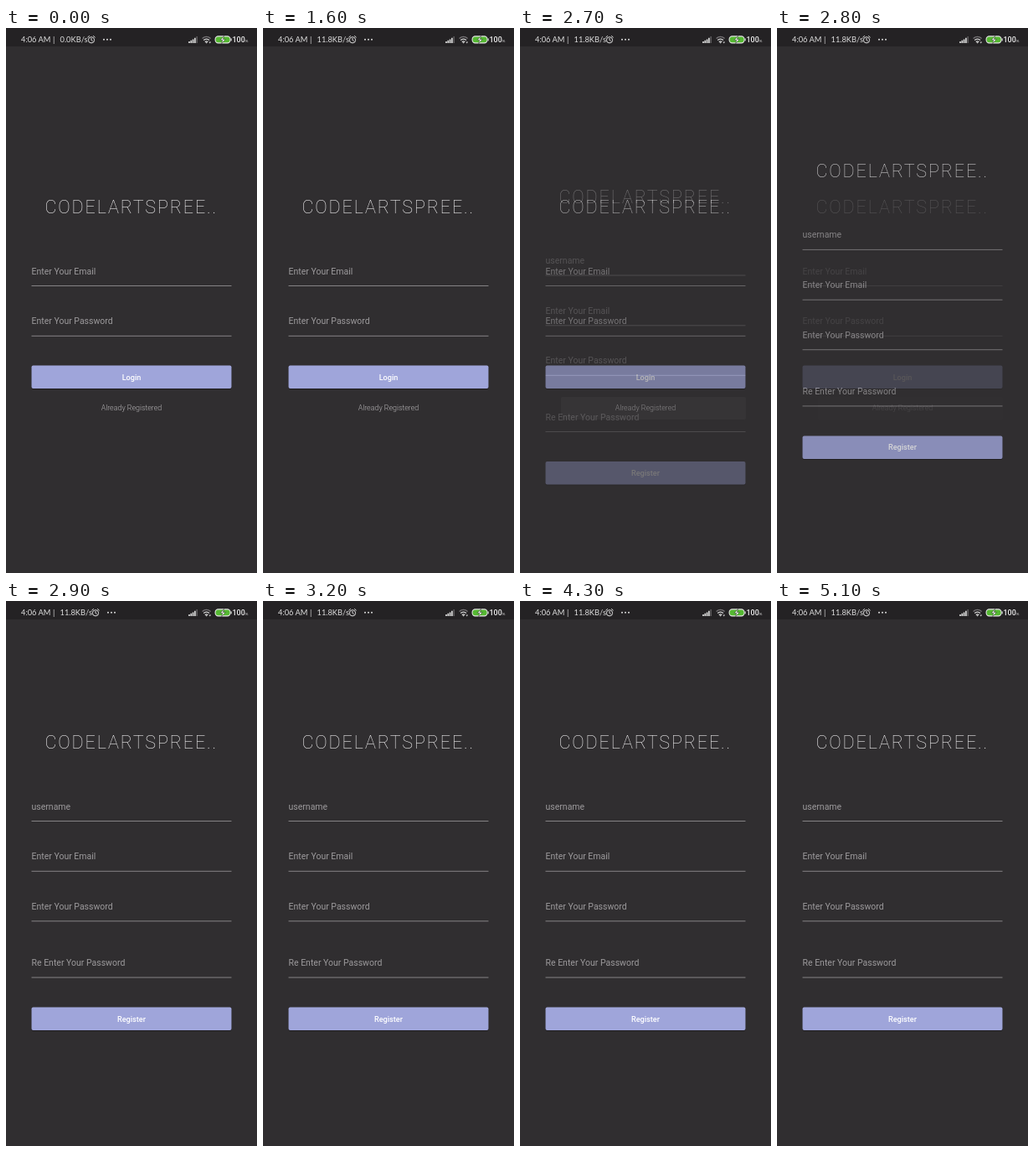
Write an HTML page that moves like this. It is 300 px wide and 650 px high and loops after 5200 ms.

```html
<!DOCTYPE html>
<html lang="en">
<head>
<meta charset="utf-8">
<title>Login to register</title>
<style>
  html, body { margin: 0; width: 100%; height: 100%; overflow: hidden; background: #302e30; }
  svg { display: block; font-family: Roboto, sans-serif; }
  .title { font-size: 21.6px; font-weight: 200; letter-spacing: 1.85px; fill: #f4f3f4; }
  .hint { font-size: 10.5px; fill: #9c9a9c; }
  .button { font-size: 9.1px; font-weight: 500; fill: #fff; text-anchor: middle; }
  .link { font-size: 8.9px; font-weight: 300; fill: #b4b2b4; text-anchor: middle; }
  .status { font: 9.3px Lato, sans-serif; fill: #dedede; }
</style>
</head>
<body>
<svg width="300" height="650" viewBox="0 0 300 650">
  <g id="login"></g>
  <g id="register"></g>
  <g class="status">
    <rect width="300" height="22" fill="#242224"/>
    <text x="18" y="17.3">4:06 AM |</text>
    <text id="speed" x="64.5" y="17.3"></text>
    <g id="alarm" fill="none" stroke="#dedede">
      <circle cy="14.3" r="3.6"/>
      <path d="M0 12v2.5l1.6 1M-4.6 11.3l2.4-2M4.6 11.3l-2.4-2"/>
      <path d="M15 13.8h10" stroke-width="2" stroke-linecap="round" stroke-dasharray="0 4"/>
    </g>
    <path d="M219 18v-2M221.3 18v-3.2M223.6 18v-4.6M225.9 18v-6.2" stroke="#e4e4e4" stroke-width="1.6"/>
    <path d="M228.2 18v-8" stroke="#5c5a5c" stroke-width="1.6"/>
    <g fill="none" stroke-width="1.3">
      <path d="M234.6 12.6q5-4.4 10 0" stroke="#777577"/>
      <path d="M236.2 14.6q3.4-2.8 6.8 0M237.8 16.5q1.8-1.4 3.6 0" stroke="#dedede"/>
    </g>
    <path d="M238.4 17h2.4l-1.2 1.4zM242.6 16.6h2.4l-1.2 2z" fill="#dedede"/>
    <rect x="250.1" y="9.9" width="18" height="8" rx="3.6" fill="#55b832" stroke="#e4e4e4" stroke-width="1.1"/>
    <path d="M269.2 12.4v3" stroke="#e4e4e4"/>
    <path d="M260.6 9.4l-4.4 5h2.6l-1.2 4.2 4.6-5.2h-2.8z" fill="#fff" stroke="#242224" stroke-width=".5"/>
    <text x="270.5" y="17.3" font-family="Roboto, sans-serif" font-weight="500" font-size="9" fill="#eee">100</text>
    <text x="285.8" y="17.3" font-size="4.6">%</text>
  </g>
</svg>
<script>
const LOOP = 5200, STEP = 100;
const byId = id => document.getElementById(id);

const title = y => `<text class="title" x="46.5" y="${y}">CODELARTSPREE..</text>`;
const field = (label, y) => `<text class="hint" x="30.5" y="${y - 14}">${label}</text>
  <path d="M30.5 ${y}h239" stroke="#858385"/>`;
const button = (label, y) => `<rect x="30.5" y="${y + 1}" width="239" height="27.6" rx="2" fill="#1d1b1d"/>
  <rect x="30.5" y="${y}" width="239" height="27.5" rx="2" fill="#9fa5da"/>
  <text class="button" x="150" y="${y + 17}">${label}</text>`;
const page = (...parts) => '<rect width="300" height="850" fill="#302e30"/>' + parts.join('');

byId('login').innerHTML = page(
  title(221.3),
  field('Enter Your Email', 307.5),
  field('Enter Your Password', 367.3),
  button('Login', 402.5),
  '<rect id="press" x="49" y="440" width="221" height="27" rx="2" fill="#3a383a"/>',
  '<text class="link" x="150" y="456.3">Already Registered</text>');

byId('register').innerHTML = page(
  title(176.3),
  field('username', 262.5),
  field('Enter Your Email', 322.3),
  field('Enter Your Password', 381.8),
  field('Re Enter Your Password', 449),
  button('Register', 484.5));

// The register page fades in while rising by a quarter of the screen.
function enter(t) {
  if (t < 2700) return { alpha: 0, rise: 0 };
  const p = Math.min(1, (t - 2545) / 290);
  return { alpha: p ** 1.7, rise: 162 * (1 - p) ** 2.1 };
}

function draw(now) {
  const t = Math.floor(now % LOOP / STEP) * STEP;
  const busy = t >= 1600;
  const { alpha, rise } = enter(t);
  byId('speed').textContent = busy ? '11.8KB/s' : '0.0KB/s';
  byId('alarm').setAttribute('transform', `translate(${busy ? 107 : 102} 0)`);
  byId('press').setAttribute('opacity', t >= 2700 ? 1 : 0);
  byId('register').setAttribute('opacity', alpha);
  byId('register').setAttribute('transform', `translate(0 ${rise})`);
  requestAnimationFrame(draw);
}
requestAnimationFrame(draw);
</script>
</body>
</html>
```
